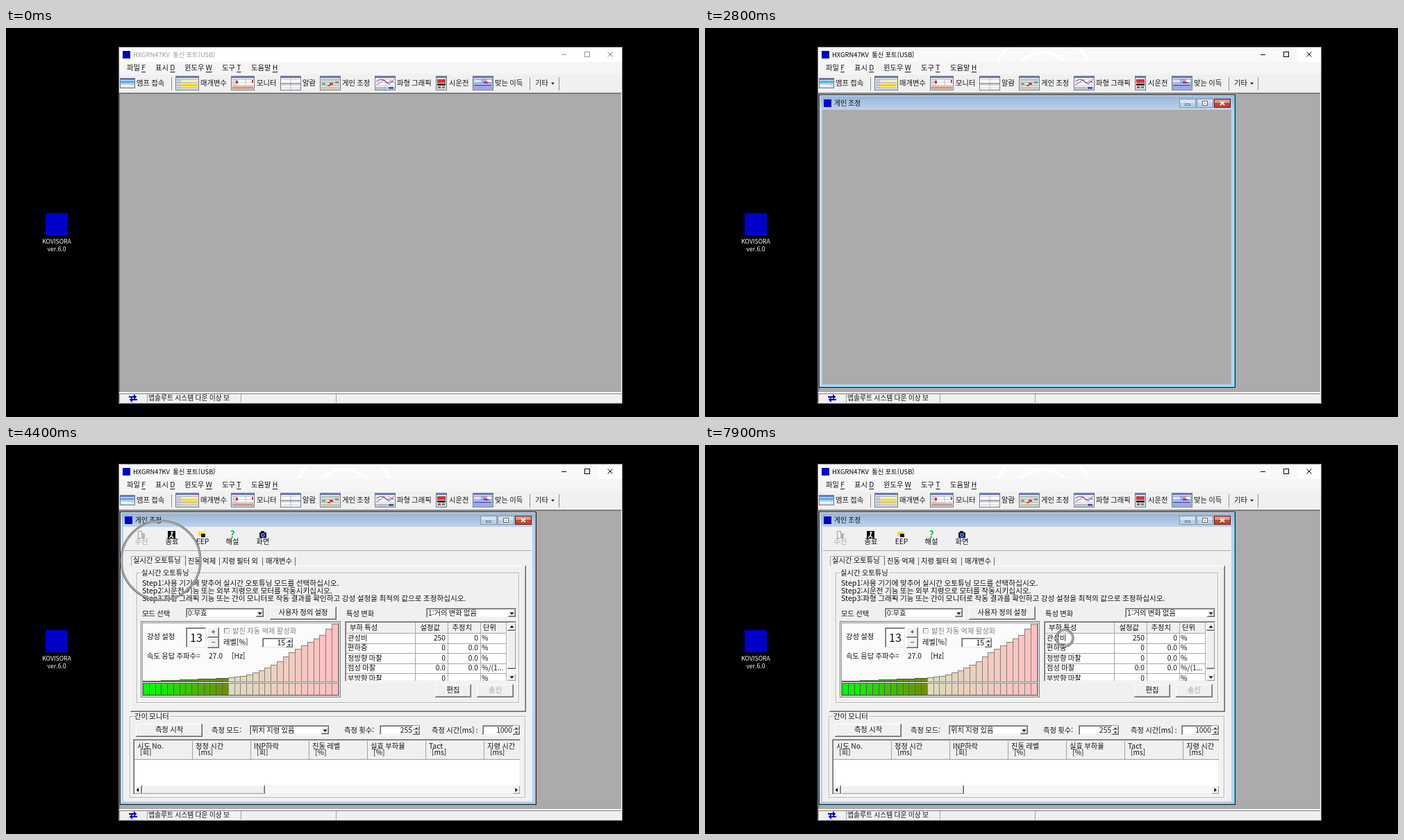
Animation, 998 px wide and 561 px high, one loop 8 s. Source, as an HTML page with a canvas:

```html
<!DOCTYPE html>
<html lang="ko">
<head>
<meta charset="utf-8">
<title>게인 조정</title>
<style>
html, body { margin: 0; width: 100%; height: 100%; overflow: hidden; background: #000; }
canvas { display: block; width: 998px; height: 561px; }
</style>
</head>
<body>
<canvas id="stage" width="998" height="561"></canvas>
<script>
const ctx = document.getElementById('stage').getContext('2d');
const LOOP = 8000;
const FACE = '#f0f0f0', MDI = '#ababab', SHADE = '#a0a0a0', DARK = '#696969', INK = '#111';
const FONT = '"Noto Sans CJK KR", "Noto Sans CJK JP", "Noto Sans CJK", sans-serif';

function fill(x, y, w, h, color) {
  ctx.fillStyle = color;
  ctx.fillRect(x, y, w, h);
}

function bevel(x, y, w, h, light, dark) {
  fill(x, y, w, 1, light);
  fill(x, y, 1, h, light);
  fill(x, y + h - 1, w, 1, dark);
  fill(x + w - 1, y, 1, h, dark);
}

const frame = (x, y, w, h, color) => bevel(x, y, w, h, color, color);

function sunken(x, y, w, h) {
  bevel(x, y, w, h, SHADE, '#fff');
  bevel(x + 1, y + 1, w - 2, h - 2, DARK, '#e3e3e3');
}

// y is the middle of the line
function text(str, x, y, size = 10.3, color = INK, align = 'left', weight = 'normal') {
  ctx.font = `${weight} ${size}px ${FONT}`;
  ctx.textAlign = align;
  ctx.fillStyle = color;
  ctx.fillText(str, x, y + size * 0.37);
  return ctx.measureText(str).width;
}

function poly(points, color) {
  ctx.fillStyle = color;
  ctx.beginPath();
  points.forEach(([x, y]) => ctx.lineTo(x, y));
  ctx.fill();
}

function line(points, color, width = 1) {
  ctx.strokeStyle = color;
  ctx.lineWidth = width;
  ctx.beginPath();
  points.forEach(([x, y]) => ctx.lineTo(x, y));
  ctx.stroke();
}

function circle(x, y, r, color, width) {
  ctx.strokeStyle = color;
  ctx.lineWidth = width;
  ctx.beginPath();
  ctx.arc(x, y, r, 0, Math.PI * 2);
  ctx.stroke();
}

// Triangle pointing along (dx, dy)
function arrow(x, y, dx, dy, size = 3, color = '#000') {
  poly([[x + dx * size * 0.6, y + dy * size * 0.6],
        [x - dx * size * 0.5 + dy * size, y - dy * size * 0.5 + dx * size],
        [x - dx * size * 0.5 - dy * size, y - dy * size * 0.5 - dx * size]], color);
}

function button(x, y, w, h, label = '', enabled = true) {
  fill(x, y, w, h, FACE);
  bevel(x, y, w, h, '#fff', DARK);
  bevel(x + 1, y + 1, w - 2, h - 2, FACE, SHADE);
  text(label, x + w / 2, y + h / 2 - 1, 10.3, enabled ? INK : SHADE, 'center');
}

function field(x, y, w, h) {
  fill(x, y, w, h, '#fff');
  sunken(x, y, w, h);
}

function combo(x, y, w, label) {
  field(x, y, w, 15);
  text(label, x + 3, y + 7.5);
  button(x + w - 13, y + 2, 11, 11);
  arrow(x + w - 7.5, y + 8, 0, 1);
}

function spin(x, y, w, label) {
  field(x, y, w, 15);
  text(label, x + w - 12, y + 7.5, 10.3, INK, 'right');
  button(x + w - 11, y + 1, 10, 6.5);
  button(x + w - 11, y + 7.5, 10, 6.5);
  arrow(x + w - 6, y + 4.5, 0, -1, 2);
  arrow(x + w - 6, y + 10.5, 0, 1, 2);
}

function group(x, y, w, h, label) {
  frame(x + 1, y + 1, w, h, '#fff');
  frame(x, y, w, h, '#b4b4b4');
  const left = x + 7;
  ctx.font = `10.3px ${FONT}`;
  fill(left - 1, y - 3, ctx.measureText(label).width + 3, 7, FACE);
  text(label, left, y);
}

// Toolbar thumbnails: x, width, label, label x, colour blocks [dx, dy, w, h, colour]
const TOOLS = [
  [164, 22, '앰프 접속', 188, [[1, 4, 20, 4, '#5cc4f0'], [2, 9, 15, 3, '#f8f8ff']]],
  [244, 34, '매개변수', 280, [[2, 5, 6, 13, '#ccd4e0'], [9, 6, 23, 3, '#fff6a0'], [9, 11, 23, 5, '#ffe43c']]],
  [324, 34, '모니터', 361, [[9, 5, 11, 9, '#fff'], [22, 5, 11, 9, '#fff'], [7, 7, 3, 4, '#e02828'], [30, 6, 2, 4, '#e02828'], [2, 15, 30, 4, '#e0a890']]],
  [395, 30, '알람', 427, [[1, 4, 13, 7, '#fff'], [16, 4, 13, 7, '#fff'], [1, 12, 13, 8, '#fff'], [16, 12, 13, 8, '#fff'], [1, 11, 28, 1, '#50606c']]],
  [452, 30, '게인 조정', 484, [[2, 5, 26, 3, '#c8d8c8'], [3, 10, 5, 3, '#78b078'], [14, 10, 5, 3, '#e03838'], [11, 13, 4, 2, '#d85030'], [2, 16, 26, 3, '#e0d8a0'], [22, 8, 5, 3, '#88a888']]],
  [531, 30, '파형 그래픽', 563, [[1, 4, 28, 11, '#fff'], [2, 16, 16, 4, '#c4cce0'], [20, 16, 7, 3, '#4858c0']]],
  [619, 16, '시운전', 638, [[2, 5, 12, 5, '#e43030'], [2, 11, 12, 3, '#333'], [3, 15, 4, 3, '#c05050'], [9, 15, 4, 3, '#58a058']]],
  [672, 30, '맞는 이득', 704, [[1, 4, 28, 16, '#a8b4f0'], [2, 5, 10, 5, '#dce4ff'], [16, 8, 7, 3, '#d03850'], [2, 13, 25, 2, '#6478d8'], [21, 5, 6, 4, '#fff']]],
];

function toolbar(enabled) {
  const color = enabled ? INK : '#858585';
  TOOLS.forEach(([x, w, label, labelX, blocks], i) => {
    const y = i ? 69 : 72, h = i ? 21 : 15;
    ctx.save();
    if (!enabled) ctx.filter = 'grayscale(1) contrast(.5) brightness(1.2)';
    fill(x, y, w, h, '#dde1e8');
    fill(x, y, w, 3, '#6a76c8');
    blocks.forEach(([dx, dy, bw, bh, c]) => fill(x + dx, y + dy, bw, bh, c));
    for (let dy = 5; dy < h - 2; dy += 4) fill(x + 2, y + dy, w - 4, 1, 'rgba(60,70,90,.28)');
    if (i === 5) {
      line([[533, 82], [539, 79], [544, 74], [549, 80], [554, 76], [559, 79]], '#d04060');
      line([[533, 77], [540, 74], [547, 77], [552, 81], [559, 74]], '#4050b0');
    }
    frame(x, y, w, h, '#74787f');
    ctx.restore();
    text(label, labelX, 79.5, 10.3, color);
  });
  text('기타', 762, 79.5, 10.3, color);
  arrow(787.5, 80, 0, 1, 2.5, color);
  for (const x of [238, 754, 796]) fill(x, 71, 1, 19, '#909090');
}

function desktop() {
  fill(0, 0, 998, 561, '#000');
  fill(57, 267, 32, 32, '#0000c8');
  text('KOVISORA', 73, 308, 8.7, '#fff', 'center');
  text('ver.6.0', 73, 319, 8.7, '#fff', 'center');
}

function mainWindow(t) {
  const active = t >= 1500;
  const ink = active ? '#000' : '#999';
  fill(162, 27, 725, 515, FACE);
  fill(162, 27, 725, 22, active ? '#f9f9f9' : '#fff');
  fill(162, 49, 725, 18, '#f5f5f5');
  if (t >= 1700) {
    ctx.save();
    ctx.beginPath();
    ctx.rect(163, 28, 720, 21);
    ctx.clip();
    circle(487, 78, 71.5, '#fff', 4);
    circle(487, 78, 43, '#fff', 4);
    ctx.restore();
  }
  fill(854, 28, 32, 21, '#fff');
  fill(168, 33, 11, 11, '#0000c8');
  text('HXGRN47KV  통신 포트(USB)', 183, 38.5, 9.4, ink);
  fill(800, 38, 7, 1, ink);
  frame(833, 34, 8, 8, ink);
  const cross = t < 200 ? '#808080' : ink;
  line([[866.5, 34.5], [873.5, 41.5]], cross);
  line([[873.5, 34.5], [866.5, 41.5]], cross);

  [[174, '파일', 'F'], [215, '표시', 'D'], [257, '윈도우', 'W'], [311, '도구', 'T'], [353, '도움말', 'H']]
    .forEach(([x, label, key]) => {
      const keyX = x + text(label + ' ', x, 57.5);
      fill(keyX, 63, text(key, keyX, 57.5), 1, INK);
    });

  toolbar(t < 2500 || t >= 2800);
  if (t >= 500 && t < 600) bevel(530, 68, 88, 24, '#fff', SHADE);
  if (t >= 600 && t < 2300) bevel(451, 68, 79, 24, '#fff', SHADE);
  if (t >= 2300 && t < 2800) bevel(451, 68, 79, 24, '#888', '#fff');

  fill(163, 93, 723, 1, SHADE);
  fill(163, 94, 723, 431, MDI);
  bevel(163, 94, 724, 432, DARK, '#fff');
  fill(163, 527, 723, 1, '#808080');
  for (const x of [163, 203, 338, 475]) fill(x, 528, 1, 12, SHADE);
  fill(177, 531, 10, 2, '#00c');
  fill(179, 535, 10, 2, '#00c');
  arrow(186, 532, 1, 0, 4, '#00c');
  arrow(180, 536, -1, 0, 4, '#00c');
  text('앱솔루트 시스템 다운 이상 보', 205, 533, 9.8);
  frame(162, 27, 726, 515, active ? '#707070' : '#606060');
}

function dialogFrame() {
  fill(164, 96, 600, 423, '#b9d1ea');
  const sky = ctx.createLinearGradient(0, 96, 0, 118);
  sky.addColorStop(0, '#94b2d2');
  sky.addColorStop(1, '#bcd3ec');
  ctx.fillStyle = sky;
  ctx.fillRect(164, 96, 600, 22);
  frame(164, 96, 600, 423, '#1c2228');
  bevel(165, 97, 598, 421, '#f4f9ff', '#48c4e8');
  fill(171, 103, 11, 11, '#0000c8');
  text('게인 조정', 186, 108.5, 9.8);
  [683, 708, 733].forEach((x, i) => {
    const hot = i === 2;
    fill(x, 102, 24, 13, hot ? '#c8452c' : '#bdd0e4');
    fill(x, 102, 24, 6, hot ? '#df9484' : '#d5e2ef');
    frame(x, 102, 24, 13, hot ? '#5c1c18' : '#8094a8');
  });
  fill(691, 109, 8, 3, '#fff');
  frame(691, 109, 8, 3, '#666');
  fill(716, 105, 8, 7, '#fff');
  frame(716, 105, 8, 7, '#666');
  fill(719, 108, 2, 1, '#666');
  line([[742, 106], [748, 111]], '#fff', 2);
  line([[748, 106], [742, 111]], '#fff', 2);
  fill(169, 118, 589, 396, MDI);
}

function dialogTools() {
  frame(190, 124, 6, 11, SHADE);
  fill(195, 127, 5, 8, '#b8b8b8');
  fill(233, 124, 11, 11, '#111');
  ctx.fillStyle = '#fff';
  ctx.beginPath();
  ctx.arc(239, 126.5, 1.4, 0, 7);
  ctx.fill();
  line([[239, 128], [238, 131], [241, 134]], '#fff', 1.5);
  line([[238, 131], [235, 134]], '#fff', 1.2);
  fill(277, 125, 9, 6, '#ffe000');
  fill(281, 128, 6, 5, '#111');
  text('?', 326, 129, 14, '#00c830', 'center', 'bold');
  fill(365, 126, 10, 8, '#181848');
  fill(367, 124, 5, 2, '#181848');
  circle(370, 130, 2, '#7080ff', 1.5);
  [['수신', 195], ['종료', 239], ['EEP', 283], ['해설', 326], ['화면', 370]]
    .forEach(([label, x], i) => text(label, x, 139.5, 10.3, i ? INK : SHADE, 'center'));
  fill(170, 152, 587, 1, SHADE);
  fill(170, 153, 587, 1, '#fff');
}

const STEEP = [7, 8, 9, 11, 14, 17, 21, 25, 30, 37, 43, 48, 53, 58, 63, 68, 77, 84];

function stiffnessChart() {
  fill(194, 254, 288, 110, '#fff');
  frame(194, 254, 288, 110, '#777');
  frame(196, 256, 284, 106, '#888');
  fill(197, 257, 282, 104, '#fbfbfb');
  const pitch = 8.77;
  for (let i = 0; i < 32; i++) {
    const x = Math.round(197 + i * pitch);
    const w = Math.round(197 + (i + 1) * pitch) - x + 1;
    const h = i < 14 ? Math.round(1.6 + i * 0.35) : STEEP[i - 14];
    const k = i < 14 ? i / 13 : (i - 14) / 17;
    const low = i < 14 ? `rgb(${k * 110},${255 - k * 110},0)` : `rgb(${220 + k * 35},${220 - k * 28},${190 + k * 4})`;
    const high = i < 14 ? `rgb(${30 + k * 80},${160 - k * 20},20)` : low;
    for (const [y, height, color] of [[342 - h, h, high], [343, 18, low]]) {
      fill(x, y, w, height, color);
      frame(x, y, w, height, i < 14 ? '#50604c' : '#8a8078');
    }
  }
  text('강성 설정', 203, 276);
  field(259, 263, 30, 30);
  text('13', 274, 278, 16, INK, 'center');
  button(290, 263, 17, 15, '+');
  button(290, 278, 17, 15, '−');
  fill(314, 264, 8, 8, FACE);
  bevel(314, 264, 8, 8, '#808080', '#ccc');
  text('발진 자동 억제 활성화', 326, 268, 10.3, '#808080');
  text('레벨[%]', 313, 284.5);
  spin(369, 278, 45, '15');
  text('속도 응답 주파수=', 203, 304);
  text('27.0', 292, 304);
  text('[Hz]', 325, 304);
}

function loadTable() {
  fill(488, 255, 248, 87, '#fff');
  fill(489, 256, 232, 15, FACE);
  ctx.save();
  ctx.beginPath();
  ctx.rect(489, 256, 246, 85);
  ctx.clip();
  const rows = [
    ['부하 특성', '설정값', '추정치', '단위'],
    ['관성비', '250', '0', '%'],
    ['편하중', '0', '0.0', '%'],
    ['정방향 마찰', '0', '0.0', '%'],
    ['점성 마찰', '0.0', '0.0', '%/(1...'],
    ['부방향 마찰', '0', '', '%'],
  ];
  rows.forEach(([name, value, guess, unit], i) => {
    const y = 263.5 + i * 14.5;
    text(name, i ? 492 : 495, y);
    text(value, i ? 633 : 625, y, 10.3, INK, 'right');
    text(guess, i ? 680 : 671, y, 10.3, INK, 'right');
    text(unit, i ? 685 : 687, y);
    fill(489, Math.round(271 + i * 14.5), 232, 1, '#a8a8a8');
  });
  for (const x of [589, 636, 683, 720]) fill(x, 256, 1, 85, '#a8a8a8');
  ctx.restore();
  fill(722, 256, 13, 85, '#f6f6f6');
  button(722, 256, 13, 12);
  button(722, 268, 13, 55);
  button(722, 329, 13, 12);
  arrow(728.5, 262, 0, -1);
  arrow(728.5, 335, 0, 1);
  sunken(488, 254, 248, 88);
}

function tuningPage() {
  bevel(179, 174, 570, 211, '#fff', DARK);
  bevel(180, 175, 568, 209, FACE, SHADE);
  fill(180, 160, 79, 15, FACE);
  bevel(180, 160, 79, 14, '#aaa', DARK);
  fill(181, 173, 77, 2, FACE);
  text('실시간 오토튜닝', 183, 166.5);
  text('진동 억제', 262, 167.5);
  text('지령 필터 외', 311, 167.5);
  text('매개변수', 374, 167.5);
  for (const x of [307, 369, 416]) fill(x, 162, 1, 12, DARK);

  group(188, 184, 551, 188, '실시간 오토튜닝');
  [
    'Step1:사용 기기에 맞추어 실시간 오토튜닝 모드를 선택하십시오.',
    'Step2:시운전 기능 또는 외부 지령으로 모터를 작동시키십시오.',
    'Step3:파형 그래픽 기능 또는 간이 모니터로 작동 결과를 확인하고 강성 설정을 최적의 값으로 조정하십시오.',
  ].forEach((step, i) => text(step, 196, 199.5 + i * 11, 10.65));
  text('모드 선택', 196, 243);
  combo(259, 235, 114, '0:무효');
  button(380, 233, 96, 19, '사용자 정의 설정');
  text('특성 변화', 490, 243);
  combo(605, 235, 131, '1:거의 변화 없음');
  stiffnessChart();
  loadTable();
  button(618, 345, 52, 19, '편집');
  button(678, 345, 53, 19, '송신', false);
}

function monitorPanel() {
  group(178, 391, 570, 118, '간이 모니터');
  button(187, 402, 96, 19, '측정 시작');
  text('측정 모드:', 296, 411.5);
  combo(351, 404, 116, '위치 지령 있음');
  text('측정 횟수:', 487, 411.5);
  spin(538, 404, 59, '255');
  text('측정 시간[ms] :', 613, 411.5);
  spin(686, 404, 55, '1000');

  fill(183, 424, 559, 81, '#fff');
  fill(184, 426, 557, 27, FACE);
  fill(184, 453, 557, 1, SHADE);
  [['시도 No.', '[회]'], ['정정 시간', '[ms]'], ['INP하락', '[회]'], ['진동 레벨', '[%]'],
   ['실효 부하율', '[%]'], ['Tact', '[ms]'], ['지령 시간', '[ms]']].forEach(([name, unit], i) => {
    const x = 189 + i * 84;
    text(name, x, 434.5);
    text(unit, x + 4, 443.5);
    if (i) fill(x - 5, 427, 1, 26, SHADE);
  });
  fill(184, 491, 557, 13, '#f6f6f6');
  button(184, 491, 12, 13);
  button(196, 491, 177, 13);
  button(729, 491, 12, 13);
  arrow(189.5, 497.5, -1, 0);
  arrow(735, 497.5, 1, 0);
  sunken(183, 424, 559, 81);
}

// Controls not painted yet while the dialog opens
const UNPAINTED = [
  [194, 195, 542, 40], [194, 237, 46, 15], [259, 235, 115, 16], [380, 235, 96, 18],
  [202, 272, 46, 14], [259, 263, 30, 30], [290, 263, 17, 30], [313, 262, 116, 14],
  [312, 280, 41, 15], [369, 278, 45, 15], [202, 300, 84, 14], [291, 300, 23, 13], [323, 300, 25, 13],
  [488, 237, 46, 15], [605, 235, 131, 15], [488, 254, 233, 88], [723, 254, 13, 88],
  [618, 345, 52, 19], [678, 345, 53, 19],
];

function dialog(t) {
  dialogFrame();
  if (t < 2900) return;
  fill(169, 118, 589, 396, FACE);
  dialogTools();
  tuningPage();
  monitorPanel();
  if (t < 3100) {
    const hidden = t < 3000 ? UNPAINTED : UNPAINTED.slice(13);
    if (t < 3000) {
      fill(194, 195, 543, 58, FACE);
      fill(198, 258, 120, 60, '#fbfbfb');
    }
    fill(721, 254, 2, 88, '#fff');
    hidden.forEach(([x, y, w, h]) => fill(x, y, w, h, MDI));
  }
}

function tooltip() {
  fill(296, 255, 80, 14, '#fff');
  frame(296, 255, 80, 14, '#767676');
  text('모드 선택', 300, 262, 9.8, '#555');
}

// Shrinking click rings: start, x, y, radius, shrink per step, steps
const RINGS = [
  [1400, 486.5, 77.5, 71, 27, 3],
  [4400, 223, 166.5, 57, 22.5, 2],
  [5600, 296.5, 241.5, 71, 27, 3],
  [7700, 518, 278.5, 57, 22.5, 3],
];

function rings(t) {
  for (const [start, x, y, radius, shrink, steps] of RINGS) {
    const step = Math.floor((t - start) / 100);
    if (step < 0 || step >= steps) continue;
    const r = radius - step * shrink;
    circle(x, y, r, '#787878', 3.2);
    circle(x, y, r, '#dcdcdc', 0.9);
  }
}

function draw(t) {
  desktop();
  mainWindow(t);
  if (t >= 2800) dialog(t);
  if (t >= 5900 && t < 6400) tooltip();
  rings(t);
}

const begin = performance.now();
function tick() {
  draw((performance.now() - begin) % LOOP);
  requestAnimationFrame(tick);
}
tick();
</script>
</body>
</html>
```
